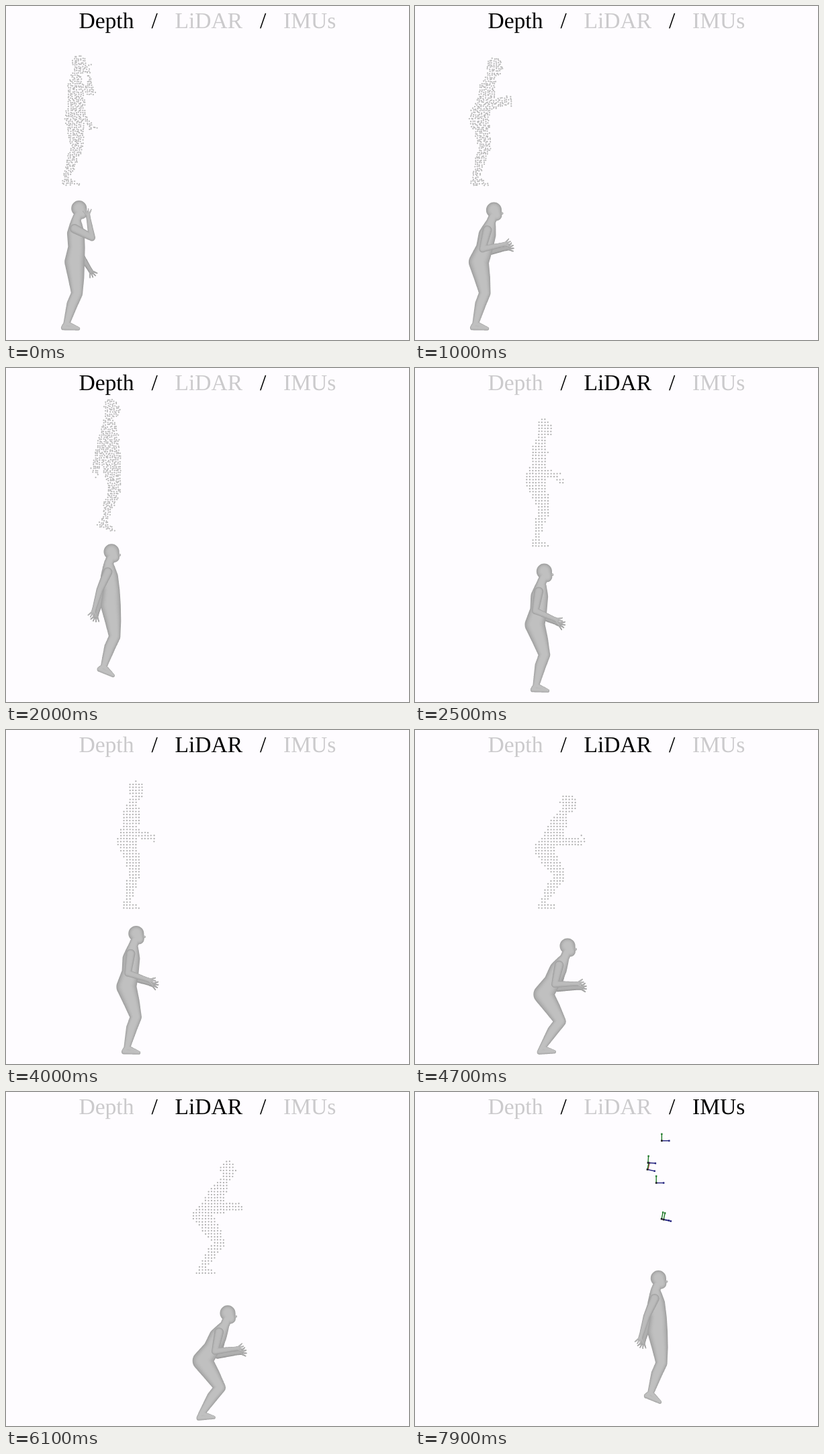
An HTML page with a canvas for the animation above (8 s loop, 600 by 498 pixels).

```html
<!DOCTYPE html>
<html lang="en">
<head>
<meta charset="utf-8">
<title>Depth / LiDAR / IMUs</title>
<style>
  html, body { margin: 0; width: 100%; height: 100%; overflow: hidden; background: #fefcff; }
  canvas, svg { position: absolute; left: 0; top: 0; display: block; }
  text { font: 33.6px "Liberation Serif", "Times New Roman", serif; text-rendering: geometricPrecision; }
</style>
</head>
<body>
<canvas id="stage" width="600" height="498"></canvas>
<svg width="600" height="498">
  <text class="mode" x="108.4" y="33">Depth</text>
  <text x="216.6" y="33">/</text>
  <text class="mode" x="251.4" y="33">LiDAR</text>
  <text x="378" y="33">/</text>
  <text class="mode" x="413" y="33">IMUs</text>
</svg>
<script>
const LOOP = 8000, STEP = 100, LIFT = -216, GROUND = 474;
const ctx = document.getElementById('stage').getContext('2d');
const modes = document.querySelectorAll('.mode');

const mix = (a, b, k) => a + (b - a) * k;
const clamp = (v, lo, hi) => Math.min(hi, Math.max(lo, v));
const ease = k => k * k * (3 - 2 * k);
const rad = deg => deg * Math.PI / 180;

// Leans in degrees: legs and spine from upright, arms from hanging, foot from level
const POSES = {
  face:   { shin: 19, thigh: -3, spine: 1, upper: 63, fore: 190, farUpper: 5, farFore: 32, foot: 22, sink: 0 },
  reach:  { shin: 17, thigh: -10, spine: 16, upper: -14, fore: 102, foot: 22, sink: 0 },
  crouch: { shin: 35, thigh: -32, spine: 31, upper: -12, fore: 97, foot: 16, sink: 6 },
  air:    { shin: 20, thigh: -6, spine: -4, upper: -24, fore: -16, foot: 43, sink: 0 },
  land:   { shin: 5, thigh: -24, spine: 5, upper: -46, fore: -13, foot: 30, sink: 0 },
  ready:  { shin: 16, thigh: -16, spine: 8, upper: -8, fore: 71, foot: 22, sink: 0 }
};
for (const name in POSES) {
  const p = POSES[name];
  POSES[name] = { farUpper: p.upper, farFore: p.fore, ...p };
}

const JUMPS = [
  { start: 1600, end: 2250, from: 90, to: 180, height: 30 },
  { start: 3250, end: 3850, from: 180, to: 291, height: 18 },
  { start: 4700, end: 5350, from: 291, to: 388, height: 26 }
];

// Every jump runs through the same four poses
const KEYS = [[0, 'face'], [1000, 'reach'], ...JUMPS.flatMap(({ start, end }) => [
  [start, 'crouch'], [mix(start, end, .615), 'air'], [mix(start, end, .92), 'land'], [end + 300, 'ready']
])];

// The figure freezes while the title changes
const bodyTime = t => Math.min(t, 2500) + clamp(t - 3900, 0, 2500) + clamp(t - 7800, 0, 100);

function poseAt(time) {
  const i = KEYS.findIndex(key => time < key[0]);
  const [t0, a] = KEYS[i - 1], [t1, b] = KEYS[i];
  const k = ease((time - t0) / (t1 - t0)), pose = {};
  for (const part in POSES[a]) pose[part] = mix(POSES[a][part], POSES[b][part], k);
  return pose;
}

function ankleAt(time) {
  let x = JUMPS[0].from, y = GROUND;
  for (const { start, end, from, to, height } of JUMPS) {
    const k = clamp((time - start) / (end - start), 0, 1);
    x += (to - from) * k;
    y -= height * 4 * k * (1 - k);
  }
  return [x, y];
}

const up = ([x, y], lean, len) => [x + Math.sin(rad(lean)) * len, y - Math.cos(rad(lean)) * len];
const down = ([x, y], lean, len) => [x + Math.sin(rad(lean)) * len, y + Math.cos(rad(lean)) * len];
const shift = ([x, y], dx, dy) => [x + dx, y + dy];
const between = (a, b, k) => [mix(a[0], b[0], k), mix(a[1], b[1], k)];

function skeleton(time) {
  const p = poseAt(time), [ax, ay] = ankleAt(time);
  const ankle = [ax, ay + p.sink];
  const knee = up(ankle, p.shin, 48), hip = up(knee, p.thigh, 47), neck = up(hip, p.spine, 62);
  const head = shift(neck, 5.5, -16);
  const shoulder = shift(between(neck, hip, .2), -2, 0), farShoulder = shift(shoulder, 4, 6);
  const elbow = down(shoulder, p.upper, 29), farElbow = down(farShoulder, p.farUpper, 29);
  return {
    ankle, knee, hip, neck, head, shoulder, elbow, farShoulder, farElbow, foot: p.foot,
    hand: down(elbow, p.fore, 32), farHand: down(farElbow, p.farFore, 32)
  };
}

// Circles swept along a line of [x, y, radius] points
function chain(...pts) {
  const out = [];
  for (let i = 0; i < pts.length - 1; i++) {
    const a = pts[i], b = pts[i + 1];
    const n = Math.max(1, Math.ceil(Math.hypot(b[0] - a[0], b[1] - a[1]) / 1.5));
    for (let j = 0; j <= n; j++) out.push(a.map((v, d) => mix(v, b[d], j / n)));
  }
  return out;
}

function arm(shoulder, elbow, hand) {
  const dir = Math.atan2(hand[1] - elbow[1], hand[0] - elbow[0]);
  const at = (a, d, r) => [hand[0] + Math.cos(a) * d, hand[1] + Math.sin(a) * d, r];
  const parts = chain([...shoulder, 7], [...between(shoulder, elbow, .5), 6.2],
    [...elbow, 5.2], at(dir, -4, 3.3), at(dir, 2, 3.4));
  for (let a = -.6; a < .7; a += .4)
    parts.push(...chain(at(dir + a, 3, 1.3), at(dir + a, 11, .8)));
  return parts;
}

function figure(s) {
  const { ankle, knee, hip, neck, head } = s;
  const spine = (k, r, dx) => [...shift(between(neck, hip, k), dx, 0), r];
  const toe = down(ankle, 90 - s.foot, 19);
  const heel = down(ankle, -s.foot - 16, 7.3);
  const body = [
    ...chain([head[0] - 1, head[1] - 2, 11.6], [head[0] + 3, head[1] + 6, 8]),
    [head[0] + 11.3, head[1] + 3, 1.8],
    ...chain([head[0] - 2, head[1] + 8, 7], [...neck, 7], spine(.12, 9.5, 0), spine(.32, 13, 0),
      spine(.65, 12.6, 1.5), [...shift(hip, -1, 0), 15]),
    ...chain([...shift(hip, -1, 0), 15], [...between(hip, knee, .5), 12], [...knee, 8.6],
      [...shift(between(knee, ankle, .35), -1.5, 0), 8.4], [...ankle, 4.8]),
    ...chain([...ankle, 4.8], [...heel, 3.6], [...toe, 2.6], [...ankle, 4.6])
  ];
  return {
    far: arm(s.farShoulder, s.farElbow, s.farHand), body,
    near: arm(s.shoulder, s.elbow, s.hand)
  };
}

// Nested layers, lighter toward the middle
function shade(circles, tone) {
  for (let k = 0; k < 5; k++) {
    const v = Math.round(tone + 28 * (1 - (1 - k / 4) ** 2));
    ctx.fillStyle = `rgb(${v},${v},${v})`;
    ctx.beginPath();
    for (const [x, y, r] of circles) {
      ctx.moveTo(x, y - k * .25);
      ctx.arc(x, y - k * .25, r * (1 - k * .15), 0, 7);
    }
    ctx.fill();
  }
}

function noise(a, b, c) {
  const v = Math.sin(a * 12.9898 + b * 78.233 + c * 37.719) * 43758.5453;
  return v - Math.floor(v);
}

// Dots on a grid inside the figure: loose for depth, regular for LiDAR
function cloud(circles, lidar, seed) {
  const gap = lidar ? 4.5 : 3.1, jitter = lidar ? .5 : 2, r = 1.15;
  const xs = circles.map(c => c[0]), ys = circles.map(c => c[1]);
  ctx.fillStyle = lidar ? '#b0b0b0' : '#bababa';
  ctx.beginPath();
  for (let i = Math.floor((Math.min(...xs) - 16) / gap); i * gap < Math.max(...xs) + 16; i++)
    for (let j = Math.floor((Math.min(...ys) - 16) / gap); j * gap < Math.max(...ys) + 16; j++) {
      const x = i * gap + (noise(i, j, seed) - .5) * jitter;
      const y = j * gap + (noise(j, i, seed + 5) - .5) * jitter;
      if (!circles.some(c => (x - c[0]) ** 2 + (y - c[1]) ** 2 < c[2] ** 2)) continue;
      ctx.moveTo(x + r, y + LIFT);
      ctx.arc(x, y + LIFT, r, 0, 7);
    }
  ctx.fill();
}

function axis(from, to, color) {
  ctx.strokeStyle = ctx.fillStyle = color;
  ctx.lineWidth = 1.4;
  ctx.beginPath();
  ctx.moveTo(...from);
  ctx.lineTo(...to);
  ctx.stroke();
  ctx.fillRect(to[0] - 1.2, to[1] - 1.2, 2.4, 2.4);
}

function sensor(joint, dx, dy, tilt) {
  const at = shift(joint, dx, dy + LIFT);
  axis(at, up(at, tilt, 10), '#1f7a28');
  axis(at, up(at, 90 + tilt, 11), '#20207c');
  ctx.fillStyle = '#222';
  ctx.fillRect(at[0] - 1.3, at[1] - 1.3, 2.6, 2.6);
}

function sensors(s) {
  const wrist = shift(s.elbow, 2, -3 + LIFT);
  axis(wrist, up(wrist, 12, 10), '#b04040');
  sensor(s.head, 4, 9, 0);
  sensor(s.elbow, 1, -3, 12);
  sensor(s.farElbow, -2, -19, 4);
  sensor(s.hip, -3, -6, 0);
  sensor(s.knee, 0, 1, 12);
  sensor(s.knee, 3, 2, 12);
}

function draw(t) {
  const mode = t < 2500 ? 0 : t < 6400 ? 1 : 2;
  modes.forEach((el, i) => { el.style.fill = i === mode ? '#000' : '#cbcacc'; });
  ctx.fillStyle = '#fefcff';
  ctx.fillRect(0, 0, 600, 498);

  const time = bodyTime(t), joints = skeleton(time);
  const { far, body, near } = figure(joints);
  if (mode === 2) sensors(joints);
  else cloud([...far, ...body, ...near], mode === 1, time / STEP);

  shade(far, 148);
  shade(body, 164);
  shade(near, 160);
}

const start = performance.now();
let last = -1;
function tick() {
  const t = Math.floor(((performance.now() - start) % LOOP) / STEP) * STEP;
  if (t !== last) draw(last = t);
  requestAnimationFrame(tick);
}
tick();
</script>
</body>
</html>
```
